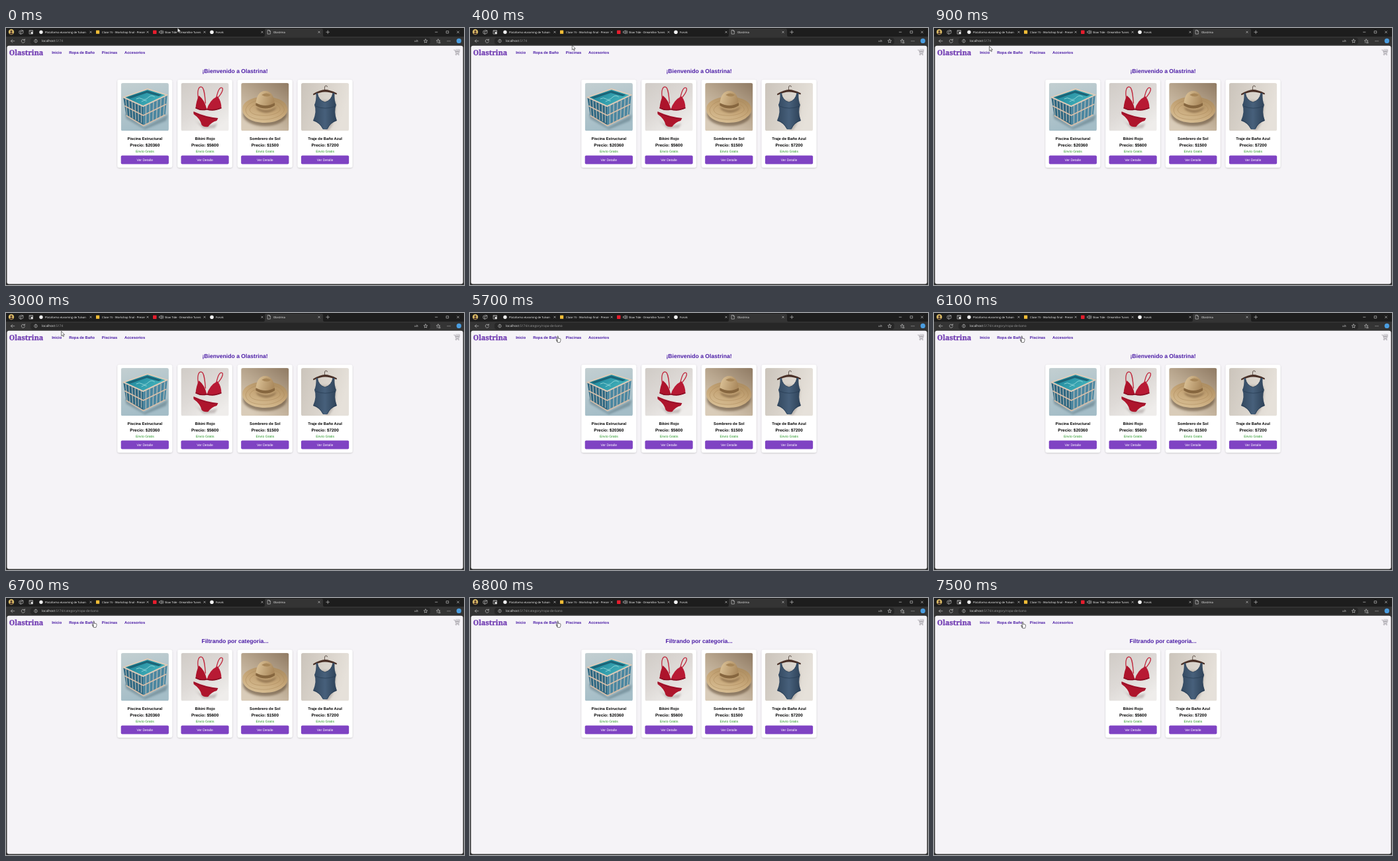
An HTML page for the animation above (8 s loop, 692x388 px).

```html
<!DOCTYPE html>
<html lang="es">
<head>
<meta charset="utf-8">
<title>Olastrina</title>
<style>
  html, body { margin: 0; width: 100%; height: 100%; overflow: hidden; background: #303030; }
  svg { display: block; width: 100%; height: 100%; }
  text { font-family: "Liberation Sans", Arial, sans-serif; text-rendering: geometricPrecision; white-space: pre; }
  .ui { font-family: "Open Sans", "Noto Sans", sans-serif; }
  .logo { font: 900 10.8px "Noto Serif", serif; fill: #7440b4; stroke: #7440b4; stroke-width: .35; }
  .nav { font-size: 5.77px; font-weight: 700; fill: #4c1da6; }
  .head { font-size: 8.65px; font-weight: 700; fill: #4c1da6; text-anchor: middle; }
  .card text { text-anchor: middle; }
  .name { font-size: 5.8px; font-weight: 700; }
  .price { font-size: 6.42px; font-weight: 700; }
  .free { font-size: 5.05px; fill: #1c8f1c; }
  .btn { font-size: 5.05px; fill: #fff; }
  .line { fill: none; stroke: #d6d6d6; stroke-width: .6; stroke-linecap: round; stroke-linejoin: round; }
</style>
</head>
<body>
<svg id="stage" viewBox="0 0 692 388" xmlns="http://www.w3.org/2000/svg">
  <defs>
    <filter id="shadow" x="-10%" y="-10%" width="120%" height="120%">
      <feDropShadow dx="0" dy=".8" stdDeviation="1.2" flood-color="#000" flood-opacity=".22"/>
    </filter>
    <filter id="soft" x="-20%" y="-20%" width="140%" height="140%"><feGaussianBlur stdDeviation="1.6"/></filter>
    <clipPath id="photo"><rect width="72.2" height="72.2" rx="2.9"/></clipPath>
    <linearGradient id="bg0" x2=".3" y2="1"><stop stop-color="#c3cfd1"/><stop offset="1" stop-color="#a4bdc7"/></linearGradient>
    <linearGradient id="bg1" x2=".7" y2="1"><stop stop-color="#d0cbc6"/><stop offset=".55" stop-color="#dedad7"/><stop offset="1" stop-color="#efedeb"/></linearGradient>
    <linearGradient id="bg2" x1="1" x2=".3" y2="1"><stop stop-color="#8f7a63"/><stop offset=".5" stop-color="#b9a78f"/><stop offset="1" stop-color="#d9ccb9"/></linearGradient>
    <linearGradient id="bg3" x2="1" y2=".3"><stop stop-color="#cbc4bb"/><stop offset="1" stop-color="#e6e1da"/></linearGradient>
    <linearGradient id="water" x2="1" y2=".4"><stop stop-color="#167b93"/><stop offset="1" stop-color="#45b4bd"/></linearGradient>
    <linearGradient id="suit" x2="1"><stop stop-color="#33485f"/><stop offset=".5" stop-color="#47607b"/><stop offset="1" stop-color="#2d4157"/></linearGradient>
    <linearGradient id="straw" x1=".8" x2=".3" y2="1"><stop stop-color="#a98a5e"/><stop offset=".5" stop-color="#c5a577"/><stop offset="1" stop-color="#d8bf95"/></linearGradient>
    <linearGradient id="crown" x2="1" y2=".3"><stop stop-color="#e0c79c"/><stop offset="1" stop-color="#ab8a5e"/></linearGradient>
  </defs>
  <g id="chrome"></g>
  <g id="page">
    <rect x="1.5" y="26.7" width="689" height="359.8" rx="3" fill="#f5f3f7"/>
    <text class="logo" x="4.8" y="40.7">Olastrina</text>
    <g id="menu"></g>
    <g fill="none" stroke="#a19ea5" stroke-width=".75">
      <path d="M676.3 33.2h2l1.5 5.2h4.4l1.2-4.2h-6.6M678.8 35.6h6M681 34.3v4M683 34.3v4"/>
      <path d="M678.5 39.7h6M679.5 32.3h5.7v1.7" stroke-width=".6"/>
      <circle cx="680" cy="40.5" r=".5"/><circle cx="684" cy="40.5" r=".5"/>
    </g>
    <text class="head" id="head" x="346" y="68.1"></text>
    <g id="cards"></g>
  </g>
  <path id="arrow" d="M0 0V7.1L1.7 5.6 2.8 8.1 3.9 7.6 2.8 5.2H5Z" fill="#fff" stroke="#222" stroke-width=".6"/>
  <path id="hand" d="M-.9 3.8V-4c0-1.1 1.5-1.1 1.5 0v3c.1-.8 1.2-.7 1.3.1.2-.7 1.2-.5 1.2.3.3-.5 1.1-.3 1.1.5V2c0 1.2-.8 1.7-.9 2.8H-.3C-.7 3.5-2 2.3-2.5 1.1-2.8.1-1.8-.1-1.3.7L-.9 1.2Z" fill="#fff" stroke="#222" stroke-width=".6"/>
</svg>
<script>
const LOOP = 8000;
const $ = id => document.getElementById(id);
const text = (x, y, s, cls, extra = "") => `<text x="${x}" y="${y}" class="${cls}" ${extra}>${s}</text>`;
const label = (x, y, s, fill = "#fff", size = 4.2) => text(x, y, s, "ui", `font-size="${size}" fill="${fill}"`);
const line = d => `<path class="line" d="${d}"/>`;
const rect = (x, y, w, h, fill, r = 0) => `<rect x="${x}" y="${y}" width="${w}" height="${h}" rx="${r}" fill="${fill}"/>`;
const dot = (x, y, r, fill) => `<circle cx="${x}" cy="${y}" r="${r}" fill="${fill}"/>`;
const cross = (x, y, r) => line(`M${x - r} ${y - r}l${2 * r} ${2 * r}m0 ${-2 * r}l${-2 * r} ${2 * r}`);

function browser() {
  const tabs = [[59, "Plataforma eLearning de Tulvan", 128], [145, "Clase 15 - Workshop final - Preser", 214],
    [240, "Slow Tide - Dreamlike Tunes", 300], [317, "Forvik", 387], [404, "Olastrina", 473]];
  return rect(0, 0, 692, 388, "#343434") + rect(0, 0, 692, 13, "#1d1d1d")
    + `<path d="M389 13q2 0 2-2V3q0-2 2-2h84q2 0 2 2v8q0 2 2 2z" fill="#343434"/>`
    + rect(37, 14.7, 604, 10.2, "#272727", 4)
    + tabs.map(([x, s, end]) => label(x, 7.7, s) + cross(end, 6.2, 1.2)).join("")
    + dot(8, 6, 4.2, "#d8b965") + dot(8, 4.9, 1.5, "#493128") + `<path d="M5.3 8.8q2.7-4 5.4 0l-1 .8H6.3z" fill="#493128"/>`
    + line("M20.3 4.5l3.6-1.4 2 1v3.7l-3.6 1.4-2-1zM22.3 5.5v3.7M22.3 5.5l3.6-1.4")
    + line("M35.5 3.5h5v5.5h-5zM35.5 5h5") + rect(37.6, 6, 3, 3, "#ddd")
    + dot(53, 6.2, 2.7, "#eee") + rect(136, 3.5, 5.2, 5.2, "#f2bd36", .5)
    + rect(222, 3.5, 5.5, 5.5, "#e71d2d", .7) + dot(311, 6.2, 2.8, "#f3f3f3")
    + line("M231.8 5.2h1.2l1.7-1.6v5.2l-1.7-1.6h-1.2zM236 4.7q1.2 1.5 0 3M237 3.8q2 2.4 0 4.8")
    + line("M395.5 3.3h2.3l1.5 1.5v4.3h-3.8zM397.8 3.3v1.5h1.5")
    + line("M483.8 6.2h4.8M486.2 3.8v4.8M648.5 6.2h3.4M665.5 4.6h3.2v3.2h-3.2z") + cross(683, 6.2, 1.5)
    + line("M12.8 19.7H7.5m2.3-2.3l-2.3 2.3 2.3 2.3M28 18.2a2.6 2.6 0 1 0 .4 2.2M28.4 16.8v1.7h-1.7")
    + line("M45 17.2a2.4 2.4 0 1 0 .01 0M45 19.3v1.5M45 18.4v.1")
    + label(54, 21.4, `localhost<tspan id="url" fill="#999"></tspan>`, "#e8e8e8", 4.8)
    + label(616.7, 21.2, "aあ", "#bbb", 4.1)
    + line("M634 16.9l.8 1.8 2 .2-1.5 1.3.4 2-1.7-1-1.7 1 .4-2-1.5-1.3 2-.2z")
    + line("M653 17l.8 1.8 2 .2-1.5 1.3M651.5 22.2l.3-2-1.5-1.3 2-.2.7-1.7M653.5 21.2h2.6M653.5 22.7h2.6")
    + [667, 669, 671].map(x => dot(x, 19.7, .5, "#ddd")).join("") + dot(684.3, 19.4, 3.6, "#4a9de0");
}

// Product pictures, each drawn in a 72 x 72 box
function pool() {
  let tiles = "";
  for (let i = 0; i < 6; i++) {
    const k = (i + .5) / 6;
    tiles += `M${5 + 28 * k} ${23 + 13 * k}l${2 - 2 * k} 25M${69 - 34 * k} ${20 + 15 * k}l${-2 + 2 * k} 28`;
  }
  return `<path d="M6 46L35 67 71 48 68 57 36 70 8 54Z" fill="#54717d" opacity=".5" filter="url(#soft)"/>
    <path d="M3.5 21.5L33.5 35 34 65 8 49.5Z" fill="#2b6580"/>
    <path d="M33.5 35L70 18 67 48.5 34 65Z" fill="#4a86a0"/>
    <path d="${tiles}" stroke="#c8c3b9" stroke-width="1.5" opacity=".75"/>
    <path d="M5.5 34.5L33.7 49 68.5 32M8 49L34 64.5 67 48" fill="none" stroke="#d8bfa9" stroke-width="1.7"/>
    <path d="M4 21.5L40 9 69.5 18 33.5 35Z" fill="url(#water)" stroke="#dfcbb8" stroke-width="2"/>
    <path d="M9 21.5L40 11.5 62 18 57 20 39 15 14 23.5Z" fill="#1b6578"/>
    <path d="M23 24q5-3 9 0t9-2 10-1M31 28q4-3 8-1" fill="none" stroke="#a5e0df" stroke-width=".8"/>`;
}
const bikini = () => `
  <path d="M20 55q14 14 35 6l-4 7-17 1z" fill="#9b918f" opacity=".5" filter="url(#soft)"/>
  <path d="M26 23C24 10 27 5 31 6S36 18 37 31M55 23C63 14 65 7 61 7S55 15 52 27" fill="none" stroke="#c0283d" stroke-width="1.3"/>
  <path d="M27 19Q36 26 39 40 29 42 22 38 23 27 27 19Z" fill="#ad142c"/>
  <path d="M55 20Q43 26 39 40 51 43 61 38 61 27 55 20Z" fill="#b81a34"/>
  <path d="M22 37.5Q30 42 39 39.5 49 43 61 37.5" fill="none" stroke="#8b0d23" stroke-width="1.7"/>
  <path d="M19 43Q36 51 56 53L54 57Q46 59 41 66 34 67 31 63 29 54 19 47Z" fill="#ae152c"/>
  <path d="M19 44.5Q37 53 55 54" fill="none" stroke="#8b1029" stroke-width="1"/>`;
const hat = () => `
  <ellipse cx="36" cy="48" rx="33" ry="17" fill="#5f4932" opacity=".55" filter="url(#soft)"/>
  <path d="M2 39C2 28 17 20 39 21S70 31 70 40 57 60 36 60 2 51 2 39Z" fill="url(#straw)"/>
  <path d="M7 40C9 31 21 25 38 25S63 32 65 39 52 55 35 55 7 50 7 40ZM13 40C15 34 24 30 38 30S58 34 59 39 48 49 35 49 13 46 13 40Z" fill="none" stroke="#a98758" stroke-width=".5"/>
  <path d="M22 36Q38 46 54 36 50 44 38 45 25 44 22 36Z" fill="#6f5334" opacity=".6" filter="url(#soft)"/>
  <path d="M22 34Q23 12 37 12 50 13 51 34 37 43 22 34Z" fill="url(#crown)"/>
  <path d="M22.3 30Q37 38 50.8 30L51 34Q37 43 22 34Z" fill="#86663f"/>
  <path d="M31 18Q38 13 45 18 40 23 31 18Z" fill="#a88759"/>`;
const swimsuit = () => `
  <path d="M28 26q-2 30 9 45h5q13-16 10-44z" fill="#8e8680" opacity=".45" filter="url(#soft)"/>
  <path d="M35.5 10V7q0-3 2-3t2 2" fill="none" stroke="#554841" stroke-width=".9"/>
  <path d="M18 16.5Q29 10 36 10 43 10 54 15.5L53.5 17.5Q43 13.5 36 13.5 29 13.5 18.5 18.5Z" fill="#4a3027"/>
  <path d="M22.5 15L24.5 15Q26 26 36 29 46 26 48 15L50.5 15Q50 27 53 33 49 43 54 57 44 60 39.5 70H33Q28 60 18 57 24 43 20 33 23 27 22.5 15Z" fill="url(#suit)"/>
  <path d="M24.5 15Q26 26 36 29 46 26 48 15M22 35Q36 41 52 35M18.5 56Q28 59 33 69M53.5 56Q44 59 39.5 69" fill="none" stroke="#263b52" stroke-width=".7"/>`;

const products = [
  ["Piscina Estructural", 20360, pool], ["Bikini Rojo", 5600, bikini],
  ["Sombrero de Sol", 1500, hat], ["Traje de Baño Azul", 7200, swimsuit]
];
const slot = i => `translate(${168.4 + i * 90.75} 78)`;

function card([name, price, art], i) {
  return `<g class="card" id="card${i}">
    <rect width="82.8" height="132.7" rx="3" fill="#fff" filter="url(#shadow)"/>
    <g transform="translate(5.3 5.1)" clip-path="url(#photo)">${rect(0, 0, 72.2, 72.2, `url(#bg${i})`)}${art()}</g>
    ${text(41.4, 90.7, name, "name")}${text(41.4, 101.3, "Precio: $" + price, "price")}
    ${text(41.4, 109.8, "Envío Gratis", "free")}
    ${rect(5.3, 114.5, 72.2, 13.1, "#7f43c3", 1.8)}${text(41.4, 122.9, "Ver Detalle", "btn")}</g>`;
}

$("chrome").innerHTML = browser();
$("menu").innerHTML = [[69.2, "Inicio"], [95.2, "Ropa de Baño"], [144.7, "Piscinas"], [179, "Accesorios"]]
  .map(([x, s]) => text(x, 39, s, "nav")).join("");
$("cards").innerHTML = products.map(card).join("");

const place = (el, x, y, on) => {
  el.setAttribute("transform", `translate(${x} ${y})`);
  el.style.display = on ? "" : "none";
};

function arrowAt(t) {
  if (t >= 900) return [83.6, 27.6];
  const p = Math.min(Math.floor(t / 100), 7) / 7;
  const k = p * p * (3 - 2 * p);
  return [259.2 - 173 * k, -.3 + 29.3 * k + 9 * Math.sin(Math.PI * k)];
}

function draw(t) {
  const clicked = t >= 5700, filtered = t >= 7500;
  $("url").textContent = ":5174" + (clicked ? "/category/ropa-de-bano" : "");
  $("head").textContent = t >= 6700 ? "Filtrando por categoria..." : "¡Bienvenido a Olastrina!";
  products.forEach((_, i) => {
    const el = $("card" + i);
    el.style.display = filtered && i % 2 === 0 ? "none" : "";
    el.setAttribute("transform", slot(filtered ? (i + 1) / 2 : i));
  });
  place($("arrow"), ...arrowAt(t), !clicked);
  place($("hand"), filtered ? 134.2 : 132.7, filtered ? 40.9 : 39.6, clicked);
}

const start = performance.now();
function tick() {
  draw((performance.now() - start) % LOOP);
  requestAnimationFrame(tick);
}
tick();
</script>
</body>
</html>
```
